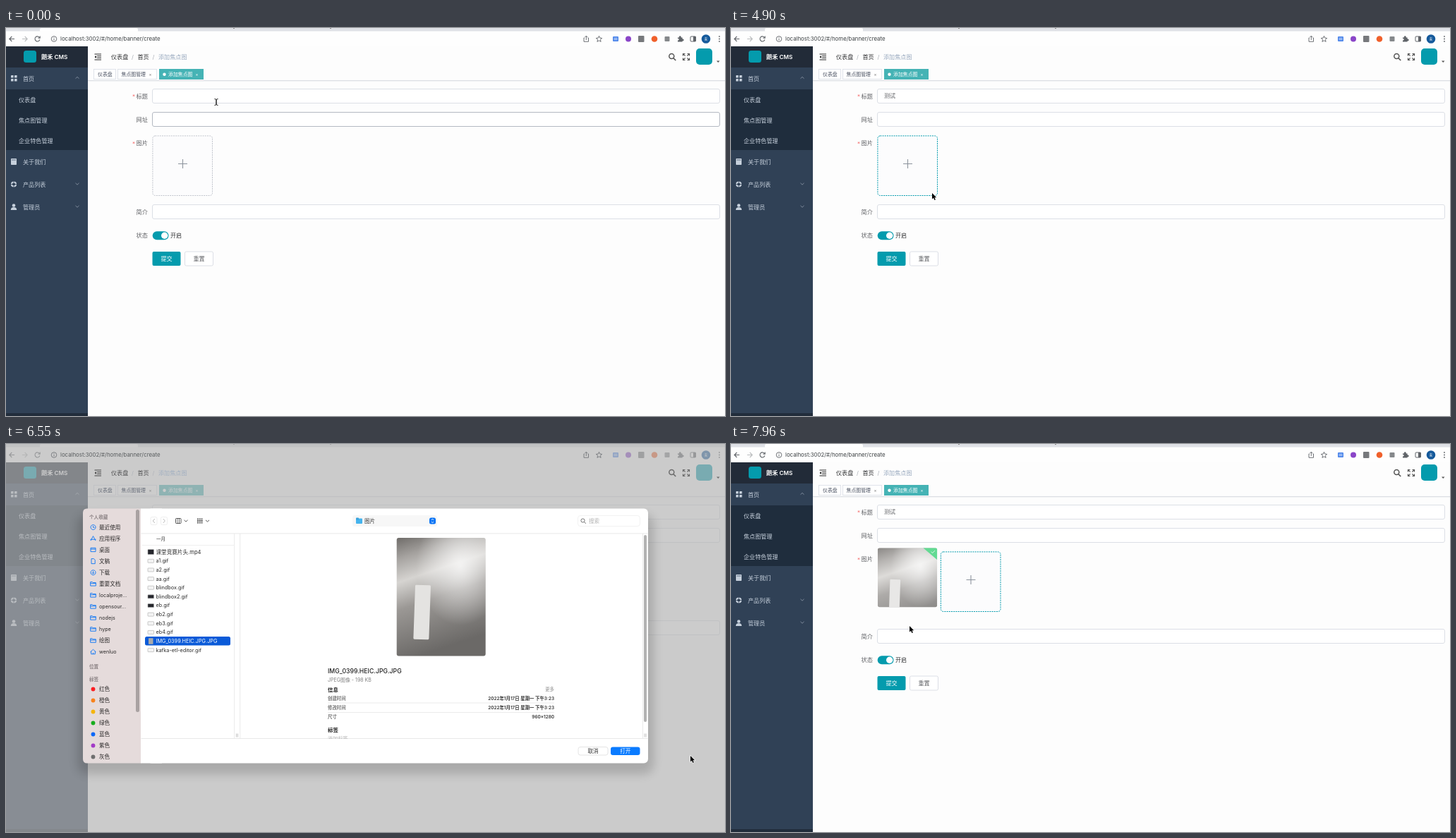
An HTML page for the animation above (8 s loop, 1019 px wide and 550 px high).

```html
<!DOCTYPE html>
<html lang="zh">
<head>
<meta charset="utf-8">
<title>CMS</title>
<style>
html, body { margin: 0; width: 100%; height: 100%; overflow: hidden; background: #fdfdfd; }
svg { display: block; width: 100%; height: 100%; }
text { font-family: Inter, "Noto Sans CJK SC", "Noto Sans CJK", sans-serif; white-space: pre; }
</style>
</head>
<body>
<svg id="stage" viewBox="0 0 1019 550"></svg>
<script>
const LOOP = 8000, TEAL = '#049bad', BLUE = '#0a74f5';
const STEPS = [0, 150, 300, 440, 590, 890, 1040, 1340, 1640, 2080, 2230, 2530, 2830, 2970, 3120, 3260,
  3550, 3700, 3850, 4000, 4300, 4450, 4600, 4750, 4900, 5200, 5350, 5500, 5650, 5800, 5950,
  6250, 6400, 6550, 6700, 6850, 7000, 7150, 7300, 7450, 7600, 7810, 7960];
// Pointer path: time, x, y
const PATH = [[0, 298, 105], [150, 298, 100], [2529, 298, 100], [2830, 298, 118], [2970, 298, 130], [3120, 296, 165],
  [3260, 292, 195], [3550, 288, 214], [4000, 285, 224], [4300, 350, 240], [4450, 434, 259],
  [4600, 410, 250], [4750, 330, 238], [4900, 285, 234], [5200, 357, 201], [5950, 320, 262],
  [6250, 262, 278], [6400, 610, 370], [6550, 970, 442], [6850, 886, 434], [7150, 878, 434],
  [7300, 732, 381], [7600, 470, 318], [7960, 253, 258]];

const T = (x, cy, str, size = 8.1, fill = '#606266', more = '') =>
  `<text x="${x}" y="${cy + size * .37}" font-size="${size}" fill="${fill}" ${more}>${str}</text>`;
const R = (x, y, w, h, r, fill, more = '') =>
  `<rect x="${x}" y="${y}" width="${w}" height="${h}" rx="${r}" fill="${fill}" ${more}/>`;
const C = (x, y, r, fill, more = '') => `<circle cx="${x}" cy="${y}" r="${r}" fill="${fill}" ${more}/>`;
const P = (d, stroke, w = 1, fill = 'none', more = '') =>
  `<path d="${d}" stroke="${stroke}" stroke-width="${w}" fill="${fill}" ${more}/>`;
const G = (body, more) => `<g ${more}>${body}</g>`;
const END = 'text-anchor="end"', MID = 'text-anchor="middle"', BOLD = 'font-weight="600"';
const chevron = (x, y, h, color, w = .9) => P(`M${x - 2.5} ${y - h}l2.5 ${2 * h}l2.5 ${-2 * h}`, color, w);

const DEFS = `<defs>
  <linearGradient id="metal" x1="0" y1="0" x2=".25" y2="1">
    <stop offset="0" stop-color="#6f6c69"/><stop offset=".17" stop-color="#a5a29f"/>
    <stop offset=".36" stop-color="#d6d4d1"/><stop offset=".58" stop-color="#9b9895"/>
    <stop offset="1" stop-color="#6b6967"/></linearGradient>
  <radialGradient id="shine" cx=".72" cy=".24" r=".5">
    <stop offset="0" stop-color="#fff" stop-opacity=".75"/><stop offset="1" stop-color="#fff" stop-opacity="0"/></radialGradient>
  <clipPath id="square"><rect width="84.5" height="84" rx="3"/></clipPath>
  <filter id="blur"><feGaussianBlur stdDeviation="7"/></filter>
  <g id="photo">${R(0, 0, 126, 167.5, 3, 'url(#metal)') + R(0, 0, 126, 167.5, 3, 'url(#shine)')
    + R(25, 67, 22, 77, 1.5, '#e4e3e1', 'transform="rotate(2 36 105)"')}</g>
</defs>`;

function sidebar() {
  const light = '#c6d0dc', arrow = '#8692a3';
  return R(0, 26, 116, 524, 0, '#304156') + R(0, 26, 116, 30, 0, '#222b38') + R(0, 87, 116, 86, 0, '#1f2d3d')
    + R(0, 546, 116, 4, 0, '#222d3b')
    + R(25, 32, 18, 17, 3.5, TEAL) + T(50, 40.5, '朗禾 CMS', 8.2, '#fff', BOLD)
    + [[7, 67], [12, 67], [7, 72], [12, 72]].map(([x, y]) => R(x, y, 3.6, 3.6, .4, light)).join('')
    + R(7, 185, 8, 9, .8, light) + P('M8 187h6', '#304156', .7)
    + C(11, 221.5, 3.1, 'none', `stroke="${light}" stroke-width="2"`) + P('M11 217v2.5M11 223.5v2.5M6.500 221.500h2.500M13 221.500h2.500', '#304156', .8)
    + C(11, 251.5, 2.3, light) + P('M6.800 258q0-4 4.200-4t4.200 4z', 'none', 0, light)
    + [['首页', 72], ['关于我们', 190], ['产品列表', 222], ['管理员', 254]].map(([s, y]) => T(24, y, s, 8.1, light)).join('')
    + [['仪表盘', 102], ['焦点图管理', 131], ['企业特色管理', 160]].map(([s, y]) => T(18, y, s, 8.1, light)).join('')
    + chevron(101, 70.5, -1.2, arrow) + chevron(101, 221, 1.2, arrow) + chevron(101, 253, 1.2, arrow);
}

function browser() {
  const k = '#5f6368';
  return R(0, 0, 1019, 5, 0, '#dfe1e6') + R(48, 0, 139, 6, 2, '#fff') + R(0, 4.5, 1019, 21.5, 0, '#fefefe')
    + R(322, 0, 2, 1, 0, '#888') + R(459, 0, 2, 1, 0, '#888')
    + P('M12 15.500h-7M8.300 12l-3.500 3.500l3.500 3.500', k, 1.1) + P('M23 15.500h7M26.700 12l3.500 3.500l-3.500 3.500', '#babcbe', 1.1)
    + P('M47.500 13.500a3.500 3.500 0 1 0 .4 3M48.200 11.500v2.700h-2.700', k, 1.1)
    + R(860, 12, 8, 7, 1, '#4d86ea') + P('M861.500 14.500h5M861.500 16.500h5', '#fff', .7)
    + C(882, 15.5, 4, '#8a45c8') + R(896, 11, 8.5, 9, 1, '#77797c') + C(919, 15.5, 4.3, '#f0602b')
    + R(933.5, 12, 7, 7, 1, '#85888b')
    + P('M952 13.500h2a1.500 1.500 0 1 1 2.600 0h2v2.200a1.400 1.400 0 1 1 0 2.500v1.300h-6.600v-2a1.300 1.300 0 1 0 0-2.500z', 'none', 0, k)
    + R(970, 12, 7.5, 7, 1, 'none', `stroke="${k}"`) + R(974, 12, 3.5, 7, 0, k)
    + C(992, 15.5, 6.3, '#14599b') + T(992, 15.5, '安', 5, '#fff', MID)
    + [12, 15.5, 19].map(y => C(1011, y, .9, k)).join('');
}

// Dark lettering and icons, which stay nearly black when the page is dimmed
function ink(s) {
  const k = '#5f6368', d = s.shift;
  const plus = 250.5 + s.uploadX;
  const label = (str, y, must) => T(201, y, str, 8.2, '#606266', END + ' font-weight="500"') + (must ? T(179, y + .8, '*', 8, '#f56c6c') : '');
  return C(68, 15.5, 3.8, 'none', `stroke="${k}" stroke-width=".9"`) + P('M68 15v2.500M68 13.200v1', k, .9)
    + T(77, 15.5, 'localhost:3002/#/home/banner/create', 7.85, '#3c4043')
    + P('M820 14h-1v5.300h6.500v-5.300h-1M822.300 17v-5.500M820.500 13l1.800-1.800l1.800 1.800', k, .9)
    + P('M840.500 11.300l1.200 2.800l3 .3l-2.300 2l.7 3l-2.600-1.600l-2.600 1.600l.7-3l-2.300-2l3-.3z', k, .9)
    + P('M125.500 37h9.500M129 39.700h6M129 42.300h6M125.500 45h9.500', '#222', 1) + P('M128 39v4l-2.500-2z', 'none', 0, '#222')
    + T(149, 41, '仪表盘', 8.1, '#303133') + T(178, 41, '/', 8, '#a9adb5')
    + T(186.5, 41, '首页', 8.1, '#303133') + T(207.5, 41, '/', 8, '#a9adb5') + T(216, 41, '添加焦点图', 8.1, '#97a8be')
    + C(943.3, 40, 3.5, 'none', 'stroke="#555" stroke-width="1.5"') + P('M945.700 42.500l3.500 3.500', '#555', 1.7)
    + P('M959.500 39.500v-3h3M965.500 36.500h3v3M968.500 42.500v3h-3M962.500 45.500h-3v-3M960 37l2.700 2.700M968 37l-2.700 2.700M968 45l-2.700-2.700M960 45l2.700-2.700', '#555', 1.2)
    + P('M1007 46.500h4.500l-2.250 2.500z', 'none', 0, '#555')
    + T(130, 65.5, '仪表盘', 6.9, '#495060') + T(163.5, 65.5, '焦点图管理', 6.9, '#495060') + T(202.5, 65.5, '×', 6, '#777')
    + label('标题', 96.5, 1) + label('网址', 130, 0) + label('图片', 163, 1) + label('简介', 260.5 + d, 0) + label('状态', 294 + d, 0)
    + T(217, 96.5, s.title, 8.1)
    + (s.pinyin ? T(217 + s.title.length * 8.1, 96.5, s.pinyin, 7.6) + P(`M${217 + s.title.length * 8.1} 101.500h${s.pinyin.length * 4.3}`, '#606266', .7) : '')
    + T(233, 294 + d, '开启', 8.1, '#303133') + T(273.5, 327 + d, '重置', 8.1, '#606266', MID)
    + R(207.900 + s.uploadX, 152.9, 84.6, 84.6, 3.5, 'none', `stroke="${s.upload ? TEAL : '#c0c4cc'}" stroke-width="1" stroke-dasharray="2 1.2"`)
    + P(`M${plus - 6.500} 192.500h13M${plus} 186v13`, '#8c939d', 1.1);
}

function page(s) {
  const d = s.shift, field = (y, color) => R(207.5, y, 804, 20, 2.5, '#fff', `stroke="${color}" stroke-width="1"`);
  const tag = (x, w) => R(x, 58.5, w, 14, 0, '#fff', 'stroke="#d8dce5" stroke-width=".8"');
  const plain = '#dcdfe6', hover = '#b4b9c2';
  return R(0, 0, 1019, 550, 0, '#fdfdfd') + browser() + sidebar()
    + R(116, 74, 903, 1, 0, '#dcdfe4') + R(116, 75, 903, 1, 0, '#f3f4f5')
    + R(978, 29, 23, 23, 5, TEAL)
    + tag(124.5, 31) + tag(158.5, 55) + R(217, 58, 63, 15, 0, '#45b3b5')
    + C(224.5, 65.8, 2.2, '#fff') + T(230, 65.5, '添加焦点图', 6.9, '#fff') + T(268.5, 65.5, '×', 6, '#fff')
    + field(86.5, s.focus ? TEAL : s.titleHover ? hover : plain) + field(119.5, s.urlHover ? hover : plain) + field(250.5 + d, plain)
    + R(208 + s.uploadX, 153, 84.5, 84.5, 3.5, '#fcfcfd')
    + R(207.7, 288.3 + d, 22.8, 12, 6, TEAL) + C(224.7, 294.3 + d, 4.7, '#fff')
    + R(207.5, 317 + d, 40, 20, 2, TEAL) + T(227.5, 327 + d, '提交', 8.1, '#fff', MID)
    + R(253.5, 317 + d, 40, 20, 2, '#fff', `stroke="${plain}"`);
}

function thumb(p) {
  const e = 1 - (1 - p) ** 2.3;
  const corner = P('M64.500 0h20v17z', 'none', 0, '#3fd27a') + P('M76 5.500l1.800 1.800l3.400-3.400', '#fff', .8);
  return G(G('<use href="#photo" transform="scale(.67)"/>' + corner, 'clip-path="url(#square)"'),
    `transform="translate(207.8 ${153 - 30 * (1 - e)})" opacity="${e}"`);
}

function candidates(x, w, words) {
  return R(x, 108, w, 20, 3, '#f4f4f4', 'stroke="#c8c8c8" stroke-width=".7"') + R(x + 3, 110.5, 22, 15, 2, BLUE)
    + [...words].map((c, i) => T(x + 6 + i * 27, 118, `${i + 1} ${c}`, 8, i ? '#333' : '#fff')).join('');
}

function finderSide() {
  const places = ['最近使用', '应用程序', '桌面', '文稿', '下载', '重要文档', 'localproje...', 'opensour...', 'nodejs', 'hype', '绘图', 'wenluo'];
  const tags = [['红色', '#fb1f23'], ['橙色', '#f8821b'], ['黄色', '#f5b50c'], ['绿色', '#17ad1e'], ['蓝色', '#0d68f8'], ['紫色', '#a33bc7'], ['灰色', '#6e6e6e']];
  const shapes = [
    'M0-3.500a3.500 3.500 0 1 0 .1 0M0-2v2.300h2', 'M-3.500 3l3.500-6.500l3.500 6.500M-4 1.200h8', 'M-3.500-2.800h7v5.300h-7zM-3.500-1h7',
    'M-2.500-3.500h3.500l1.700 1.700v5.300h-5.200z', 'M0-3.500a3.500 3.500 0 1 0 .1 0M0-2v3.700M-1.600.2l1.600 1.600l1.600-1.600'];
  const folder = 'M-3.800 2.800v-5.500h2.700l.8 1h4.100v4.500zM-3.800-.6h7.600', home = 'M-4 .3l4-3.600l4 3.600M-2.800-.6v3.800h5.600v-3.800M0 3.200v-2';
  const head = (s, y) => T(118, y, s, 6.6, '#8b8284', BOLD);
  return P('M191.500 91.500h-76.500q-6 0-6 6v349q0 6 6 6h76.500z', 'none', 0, '#e5dbdb')
    + head('个人收藏', 104) + head('位置', 315.5) + head('标签', 334)
    + places.map((s, i) => {
      const y = 118 + i * 16.05, latin = /^[a-z]/.test(s);
      return G(P(i === 11 ? home : shapes[i] || folder, BLUE, .9), `transform="translate(123.5 ${y})"`) + T(132, y, s, latin ? 7.2 : 7.6, '#2c2a2a');
    }).join('')
    + tags.map(([s, c], i) => C(123.5, 347.5 + i * 16, 2.9, c) + T(132, 347.5 + i * 16, s, 7.6, '#2c2a2a')).join('')
    + R(184, 93, 5, 287, 2.5, '#a9a2a2');
}

function details() {
  const line = (y, key, value) => T(456, y, key, 6.4, '#777', BOLD) + T(777, y, value, 6.4, '#333', END + ' ' + BOLD);
  const date = '2022年1月17日 星期一 下午3:23';
  return '<use href="#photo" x="553.7" y="133"/>'
    + T(456, 322, 'IMG_0399.HEIC.JPG.JPG', 8.7, '#222', 'font-weight="500"') + T(456, 334, 'JPEG图像 - 198 KB', 7, '#808080')
    + T(456, 348, '信息', 7.4, '#222', BOLD) + T(777, 348, '更多', 6.4, '#888', END)
    + line(360.5, '创建时间', date) + line(373.5, '修改时间', date) + line(387, '尺寸', '960×1280')
    + P('M456 367h321M456 380.500h321', '#e2e2e2', .7)
    + T(456, 405, '标签', 7.4, '#222', BOLD) + T(456, 417.5, '添加标签', 7.2, '#b5b5b5');
}

function finder(s) {
  const files = ['课堂竞赛片头.mp4', 'a1.gif', 'a2.gif', 'aa.gif', 'blindbox.gif', 'blindbox2.gif', 'eb.gif', 'eb2.gif', 'eb3.gif', 'eb4.gif', 'IMG_0399.HEIC.JPG.JPG', 'kafka-etl-editor.gif'];
  const dark = [0, 5, 6], active = s.picked && !s.closing;
  const rows = files.map((name, i) => {
    const y = 153 + i * 12.63, on = s.picked && i === 10;
    const icon = i === 10 ? R(202, y - 4, 6.5, 8.5, .5, '#aaa')
      : R(201, y - (i ? 2.3 : 3.5), 8.5, i ? 5 : 7, .6, dark.includes(i) ? '#25262c' : '#f4f4f4', 'stroke="#aaa" stroke-width=".6"');
    return (on ? R(197, y - 6.3, 121, 12.6, 2.5, s.closing ? '#4d86f0' : '#0a5ad8') : '') + icon
      + T(212.5, y, name, i ? 7.3 : 7.6, on ? '#fff' : '#2b2b2b');
  }).join('');
  const grid = [0, 1, 2].map(i => [0, 1, 2].map(j => R(271 + i * 2.8, 105.5 + j * 2.6, 1.9, 1.8, .2, '#555')).join('')).join('');
  const main = R(191, 91.5, 30, 361, 0, '#fff') + R(200, 91.5, 710, 361, 6, '#fff')
    + R(205, 103.5, 9, 11, 2, 'none', 'stroke="#eee"') + R(219.5, 103.5, 9, 11, 2, 'none', 'stroke="#eee"')
    + P('M210.800 106l-2.500 3l2.500 3M222.800 106l2.500 3l-2.500 3', '#bbb', 1)
    + R(240.500, 105.500, 7.500, 7, .8, 'none', 'stroke="#555"') + P('M243 105.500v7M245.500 105.500v7', '#555', .8)
    + chevron(255, 109, 1.2, '#555', 1) + grid + chevron(285.5, 109, 1.2, '#555', 1)
    + R(491, 101, 120, 16, 3.500, '#f7f7f7') + R(496, 105.5, 9, 7.5, 1, '#45b4ee') + R(496, 104.5, 4, 3, .8, '#38a2dc')
    + T(508, 109, '图片', 7.6, '#333') + (s.closing ? '' : R(600, 104.5, 9, 9, 2.5, BLUE))
    + P('M602.800 108l1.700-1.800l1.700 1.800M602.800 110l1.700 1.800l1.700-1.800', s.closing ? '#444' : '#fff', .9)
    + R(810.500, 101.500, 88, 15, 3.500, '#fff', 'stroke="#f2f2f2"') + C(817.500, 108.500, 2.6, 'none', 'stroke="#666" stroke-width=".9"')
    + P('M819.400 110.500l2.300 2.300', '#666', 1) + T(826, 109, '搜索', 7.6, '#b2b2b2')
    + P('M191.500 126.900h718M191.500 417.500h718', '#e2e2e2', .8) + T(213, 135, '一月', 6.4, '#777', BOLD) + P('M193 143.500h130', '#e9e9e9', .7)
    + rows + (s.picked ? details() : '') + R(440, 418, 350, 6, 0, '#fff')
    + P('M323.700 127v290M331.700 127v290M902.500 127v290', '#e4e4e4', .8) + P('M326.500 410.500v5M328.500 410.500v5M905 410.500v5M907 410.500v5', '#aaa', .7)
    + R(904, 129, 4, 265, 2, '#b2b2b2')
    + R(811, 429.5, 42, 11.5, 3, '#fff', 'stroke="#ddd" stroke-width=".8"') + T(832, 435.3, '取消', 7.6, '#333', MID)
    + R(857, 429.5, 41.5, 11.5, 3, active ? '#0a7bff' : '#fff', active ? '' : 'stroke="#ddd" stroke-width=".8"')
    + T(877.8, 435.3, '打开', 7.6, active ? '#fff' : s.picked ? '#333' : '#bbb', MID);
  return G(R(101, 100, 817, 368, 14, '#000', 'filter="url(#blur)" opacity=".16"')
    + G(finderSide(), `opacity="${s.closing ? .4 : 1}"`) + G(main, `opacity="${s.closing ? .88 : 1}"`),
    `opacity="${s.sheet}" transform="translate(0 ${s.closing ? -5.2 : 0})"`);
}

function pointer(t) {
  if (t >= 890 && t < 2830) return '';
  const i = Math.max(1, PATH.findIndex(p => p[0] > t)), a = PATH[t >= 7960 ? PATH.length - 2 : i - 1], b = PATH[t >= 7960 ? PATH.length - 1 : i];
  const p = (t - a[0]) / (b[0] - a[0]), x = a[1] + (b[1] - a[1]) * p, y = a[2] + (b[2] - a[2]) * p;
  const beam = t < 890 || t === 2970;
  return G(beam ? P('M-2.500-4.500q2.500 0 2.500 1.500v6q0 1.500-2.500 1.500M2.500-4.500q-2.500 0-2.500 1.500v6q0 1.500 2.500 1.500', '#222', 1)
    : P('M0 0v8.500l2-1.800l1.400 3.200l1.500-.7l-1.400-3h2.700z', '#fff', 1.2, '#000', 'paint-order="stroke"'), `transform="translate(${x} ${y})"`);
}

function state(t) {
  const within = (a, b) => t >= a && t < b;
  const uploaded = t >= 7450;
  return {
    focus: within(300, 3550), titleHover: within(150, 300), urlHover: t < 150 || t === 2970,
    title: t < 1340 ? '' : t < 2530 ? '测' : '测试',
    pinyin: within(890, 1040) ? 'c' : within(1040, 1340) ? 'ce' : within(1640, 2080) ? 's' : within(2080, 2230) ? 'sh' : within(2230, 2530) ? 'shi' : '',
    upload: t >= 3120, uploaded, uploadX: uploaded ? 89.5 : 0, shift: uploaded ? 12 : 0,
    dim: within(5200, 7300) ? .67 : within(7300, 7450) ? .4 : 0,
    sheet: within(5350, 7450) ? Math.min(1, (t - 5200) / 300) : 0,
    picked: t >= 6250, closing: t >= 7300
  };
}

function draw(t) {
  const s = state(t);
  const caretX = 217.5 + s.title.length * 8.1 + s.pinyin.length * 4.2;
  const words = { c: '才从次成出', ce: '测侧策册厕', s: '是说上试三四', sh: '是上试时说事', shi: '试是时事使十' }[s.pinyin];
  return DEFS + page(s)
    + (s.dim ? R(0, 0, 1019, 550, 0, s.closing ? '#9e9e9e' : '#b3b3b3', `opacity="${s.dim}"`) : '')
    + G(ink(s), `opacity="${s.dim ? .8 : 1}"`)
    + (s.focus ? P(`M${caretX} 92v9.500`, '#444', .8) : '')
    + (words ? (s.title ? candidates(226, 177, words) : candidates(203, 148, words)) : '')
    + (s.uploaded ? thumb((t - 7450) / 1000) : '')
    + (s.sheet ? finder(s) : '') + pointer(t);
}

const stage = document.getElementById('stage'), start = performance.now();
let shown = -1;
function tick() {
  const now = (performance.now() - start) % LOOP;
  const t = STEPS.filter(v => v <= now).pop();
  if (t !== shown) stage.innerHTML = draw(shown = t);
  requestAnimationFrame(tick);
}
tick();
</script>
</body>
</html>
```
